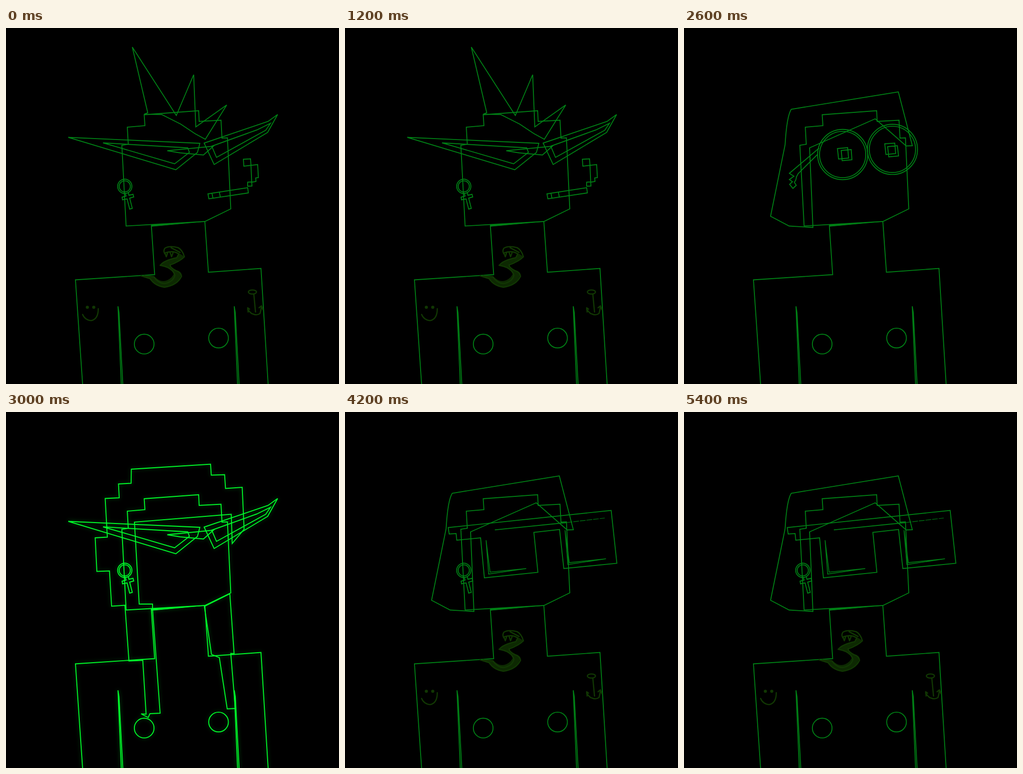
Recreate the animation shown at these times as an HTML page. Size 700 px wide and 747 px high, loop 5.6 s.

```html
<!DOCTYPE html>
<html lang="en">
<head>
<meta charset="utf-8">
<title>Neon outfits</title>
<style>
  html, body { margin: 0; width: 100%; height: 100%; overflow: hidden; background: #000; }
  svg { display: block; width: 100vw; height: 100vh; }
  #figure { fill: none; stroke: #00ff2b; stroke-width: 1.9; opacity: .5; }
  #figure.lit { opacity: 1; filter: drop-shadow(0 0 4px #00ff2b59); }
  #tattoos { stroke: #226f06; stroke-width: 2.6; stroke-linecap: round; stroke-linejoin: round; filter: blur(.6px); }
  .ink { fill: #226f06; stroke: none; }
  .shade { fill: #1a5205; stroke: none; }
</style>
</head>
<body>
<svg viewBox="0 0 700 747">
  <g id="figure">
    <g id="body">
      <path d="M418 406L252.5 415.5L243.5 246L257 244L255 208L292 205L290.5 182L405 173.5L406 196L452 193.5L454 231L465.5 230.5L472.5 379.5Z"/>
      <path d="M161 747L146 528.5L312.5 517.5L305.5 414M418 406L425.5 512.5L536 504.5L551 747"/>
      <path d="M305.5 413L418 406L305.5 416.3Z" fill="#00ff2b" stroke-width="1"/>
      <path d="M242.3 747L235.4 584L237.5 597L245.5 747M486.8 747L479.8 584L482 597L490 747"/>
      <circle cx="290.5" cy="663.2" r="20.7"/>
      <circle cx="446.8" cy="650.6" r="20.7"/>
    </g>

    <g id="mohawk">
      <path d="M298 178L265.5 40L358 183.5L394.5 98L399 207.5L464 161.5L419 233.5L397 221.5L367 201.5L327 181.5L290.5 181Z"/>
    </g>

    <g id="bob">
      <path d="M271 418.5L221 415.5L182 395L212.5 245Q216 185 225.5 170.5L450.5 134L480 247L467 247.5L402 190.5L264 251.5Z"/>
    </g>

    <g id="curls">
      <path d="M308 413L308 403L280 403L270 231L473.5 214.5L475.5 276L500.5 246L496.5 158L461.5 160.5L459.5 131.5L431.5 132.5L430 109.5L263.5 120L263 149.5L236.5 151L238 180L208.5 181.5L213 262.5L187.5 264L191 334.5L217.5 333.5L222 407.5L250 405.5L258.5 522.5L287.5 521L294.5 634L284 633.5L299 641L302.5 633L324 632Z"/>
      <path d="M417 408L470.5 381.5L479.5 507L472.5 506.5L482 622L465 623L448.5 515.5L432 508.5Z"/>
    </g>

    <g id="shades">
      <path d="M131 229.5L407.5 242L402.5 261L357 297.5ZM204 241L382 251.5L385.5 261L354.5 285Z"/>
      <path d="M339 257.5L436 248L415 266.5L366 262Z"/>
      <path d="M416.5 241.5L551 196L571 181.5L550 219L437.5 286.5ZM432.5 248L527 214L556 200L546 214.5L442.5 271.5Z"/>
    </g>

    <g id="specs">
      <circle cx="333.5" cy="265.5" r="52.7"/>
      <circle cx="333.5" cy="265.5" r="48.6"/>
      <circle cx="438.2" cy="254.7" r="52.7"/>
      <circle cx="438.2" cy="254.7" r="48.6"/>
      <path d="M322.5 253L344 251L346 273L325 275ZM330.5 257L351.5 255L353 276.5L332.5 278.5Z"/>
      <path d="M422 243L443 241.5L445 263.5L424.5 265.5ZM428 249L448.5 247L451 268.5L430.5 270.5Z"/>
      <path d="M284 252L221.5 305L231 311L221.5 318L228 322.5L222 328L229 336.5L236 330L232 324L235 319L236.5 312L240 305.5L280.5 265.5"/>
    </g>

    <g id="visor">
      <path d="M217 242.5L559.5 206.5L571.5 317.5L460 328.5L451 246.5L397 252.5L405.5 336.5L293 348L285 264L235 269L233.5 255L219 256Z"/>
      <path d="M296.5 269L302 340L381 328.5L305 336ZM462.5 248L468.5 320L548.5 308L471.5 316Z" stroke-width="1.6"/>
      <path d="M315 247.4L466 232"/>
      <path d="M466 232L546 222.5" stroke-width="1.2" stroke-dasharray="12 2"/>
    </g>

    <g id="earring">
      <circle cx="249.7" cy="332.3" r="15"/>
      <circle cx="249.7" cy="332.3" r="11.7"/>
      <path d="M250.5 347L252.5 352.5L244 355L245 360.5L254.5 358.5L260 380L265.5 378.5L260 357L268.5 354.5L267 349L258.5 351L257 345"/>
    </g>

    <g id="cigarette">
      <path d="M424.5 348L508 335L509.5 346L426.5 358.5ZM433 346.5L435 357M448.5 344L450.5 355"/>
      <path d="M515 288.5L514 274.5L499 275.5L500 290L529 286.5L530.5 314L525 314.5L525.5 322L516.5 323.5L517 331.5L508 332L508 323.5L516.5 323Z"/>
    </g>

    <g id="tattoos">
      <circle class="ink" cx="171" cy="586" r="3.3"/>
      <circle class="ink" cx="184.5" cy="586" r="3.3"/>
      <path d="M161 601Q166 613 179 614Q194 611 194 589"/>
      <ellipse cx="518" cy="554" rx="8.5" ry="4.3"/>
      <path d="M521 559L524.5 596M512 590L508 587L509 596M508 590Q515 600 519 600Q527 604 534 599Q536 592 537 584M532 587L537 583L540 591"/>
      <path class="shade" d="M324 498Q334 487 360 482L363 472L374 479Q366 488 346 495L345 500L368 516Q366 538 333 544Q313 540 304 527L284 520L311 521Q330 540 348 523L353 516Q347 502 324 498Z"/>
      <path d="M284 520L303 526Q313 541 333 544Q360 540 369 521Q368 512 357 509Q345 503 345 497Q365 490 375 480Q371 466 362 461Q344 456 334 462Q330 468 334 474"/>
      <path d="M290 520L311 522Q321 537 335 536Q352 532 355 519Q350 502 324 498Q333 487 359 482L363 474Q351 466 334 472L337 480L340 471M345 471L348 480L351 472M347 461L366 471"/>
    </g>
  </g>
</svg>
<script>
  const HOLD = 1400, FADE = 200;
  const outfits = [
    ["mohawk", "shades", "earring", "cigarette", "tattoos"],
    ["bob", "specs"],
    ["curls", "shades", "earring"],
    ["bob", "visor", "earring", "tattoos"]
  ];
  const figure = document.getElementById("figure");
  const parts = [...figure.children].filter(part => part.id !== "body");

  function draw() {
    const time = performance.now() % (HOLD * outfits.length);
    const outfit = outfits[Math.floor(time / HOLD)];
    const phase = time % HOLD;
    for (const part of parts) part.style.display = outfit.includes(part.id) ? "" : "none";
    figure.classList.toggle("lit", phase >= FADE && phase < HOLD - FADE);
    requestAnimationFrame(draw);
  }
  draw();
</script>
</body>
</html>
```
